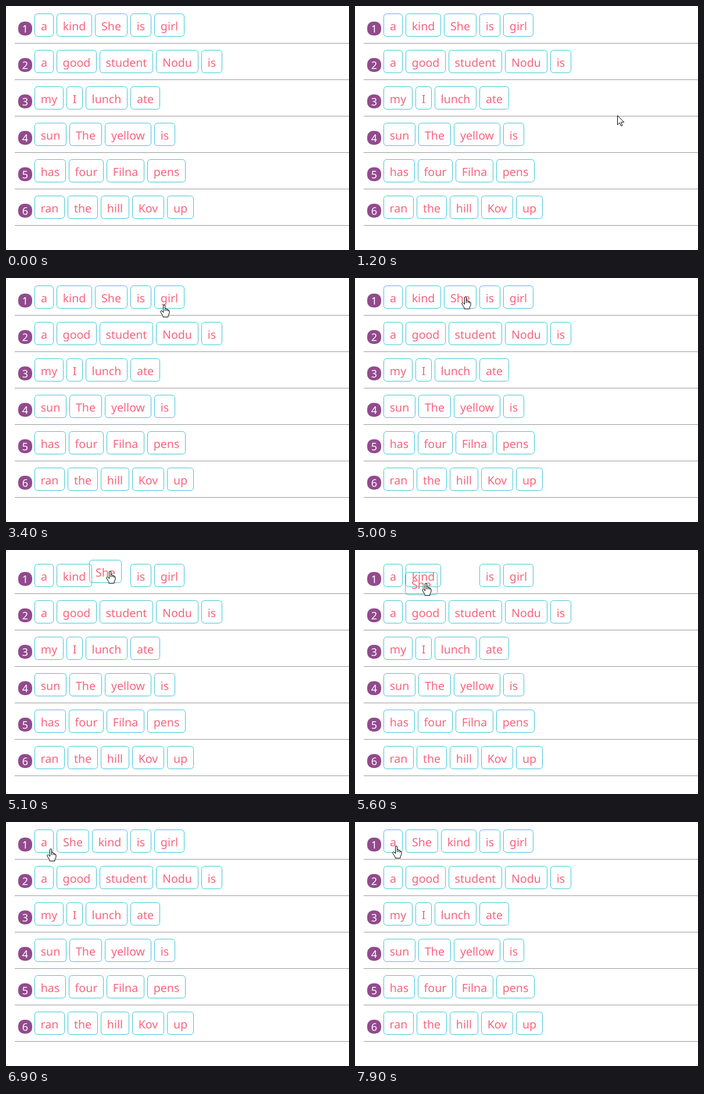
An HTML page that plays this animation: 590x422 px, repeating every 8 s.

```html
<!DOCTYPE html>
<html lang="en">
<head>
<meta charset="utf-8">
<style>
html, body { margin: 0; width: 100%; height: 100%; overflow: hidden; background: #fff; }
svg { display: block; width: 590px; height: 422px; font-family: "Noto Sans", "Open Sans", sans-serif; text-anchor: middle; text-rendering: geometricPrecision; }
.line { stroke: #999; }
.badge { fill: #924a8d; }
.num { fill: #fff; font-size: 18px; }
.box { fill: none; stroke: #3cc5d5; }
.word { fill: #f8647f; font-size: 19.6px; }
.cursor { fill: #fff; stroke: #000; stroke-linejoin: round; }
</style>
</head>
<body>
<svg id="stage" viewBox="0 0 590 422"></svg>
<script>
const LOOP = 80, STEP = 100; // time runs in steps of 100 ms
const DRAG = 51, SWAP = 60, DROP = 69;
const LEFT = 49, TOP = 13, ROW = 63, GAP = 5, PAD = 22.1;
const rows = [
  "a kind She is girl", "a good student Nodu is", "my I lunch ate",
  "sun The yellow is", "has four Filna pens", "ran the hill Kov up"
];
// Cursor path: first step, last step, x, y
const moves = [
  [7, 8, 506, 235], [12, 13, 395, 143], [16, 18, 273, 140],
  [20, 20, 265, 131], [21, 22, 281, 34], [25, 26, 285, 34],
  [34, 35, 245, 57], [38, 45, 183, 32], [51, 56, 115, 57],
  [59, 61, 65, 48], [65, 66, 62, 46], [69, 69, 70, 46], [75, 79, 64, 41]
];

function add(parent, tag, attrs, text = "") {
  const el = document.createElementNS("http://www.w3.org/2000/svg", tag);
  for (const k in attrs) el.setAttribute(k, attrs[k]);
  el.textContent = text;
  return parent.appendChild(el);
}
const place = (el, x, y) => el.setAttribute("transform", `translate(${x} ${y})`);
const show = (el, on) => el.setAttribute("visibility", on ? "visible" : "hidden");

const stage = document.getElementById("stage");
const list = add(stage, "g");

function addTile(parent, word) {
  const el = add(parent, "g");
  const label = add(el, "text", { class: "word", y: 29 }, word);
  const w = Math.floor(label.getComputedTextLength() + PAD);
  label.setAttribute("x", w / 2);
  add(el, "rect", { class: "box", x: .5, y: .5, width: w - 1, height: 39, rx: 5 });
  return { el, w };
}

function arrange(tiles) {
  let x = LEFT;
  for (const { el, w } of tiles) {
    place(el, x, 0);
    x += w + GAP;
  }
}

const [first] = rows.map((row, i) => {
  const g = add(list, "g");
  place(g, 0, TOP + ROW * i);
  add(g, "path", { class: "line", d: "M15 51.5H590" });
  add(g, "rect", { class: "badge", x: 21, y: 14, width: 24, height: 24, rx: 10 });
  add(g, "text", { class: "num", x: 33, y: 33 }, i + 1);
  const tiles = row.split(" ").map(word => addTile(g, word));
  arrange(tiles);
  return tiles;
});
const [a, kind, she, ...rest] = first;

const held = addTile(stage, "She").el;
const cursor = add(stage, "g", { class: "cursor" });
const arrow = add(cursor, "path", { d: "M.5.5V16.5L4.2 13 6.8 18.5 9 17.5 6.6 12H11.8z" });
const hand = add(cursor, "path", {
  d: "M5.5 13.5V2a1.5 1.5 0 0 1 3 0V6.7q2.5-.8 2.7 1V8q2.3-.6 2.5 1v.7q2.3-.4 2.3 1.3V15l-2 4v2.5h-9V19.5L1 13q-.8-1.7.6-2.3 1.6-.4 2.6 1.3zM8.5 6.5V11M11.2 8V11M13.7 9.5V11.5"
});

function cursorAt(t) {
  let x = 492, y = 429;
  for (const [start, end, toX, toY] of moves) {
    if (t < start) break;
    const p = Math.min(1, (t - start + 1) / (end - start + 1));
    x += (toX - x) * p;
    y += (toY - y) * p;
  }
  return [Math.round(x), Math.round(y)];
}

function draw(now) {
  const t = Math.floor(now / STEP) % LOOP;
  const [x, y] = cursorAt(t);
  const dragging = t >= DRAG && t < DROP;
  const pointing = t > 20 && (t < 35 || t > 38);

  place(list, 0, dragging ? 11 : 0);
  arrange(t < SWAP ? first : [a, she, kind, ...rest]);
  show(she.el, !dragging);
  show(held, dragging);
  place(held, x - 29, y - 19);

  place(cursor, x, y);
  show(arrow, t >= 7 && !pointing);
  show(hand, pointing);
  requestAnimationFrame(draw);
}
requestAnimationFrame(draw);
</script>
</body>
</html>
```
